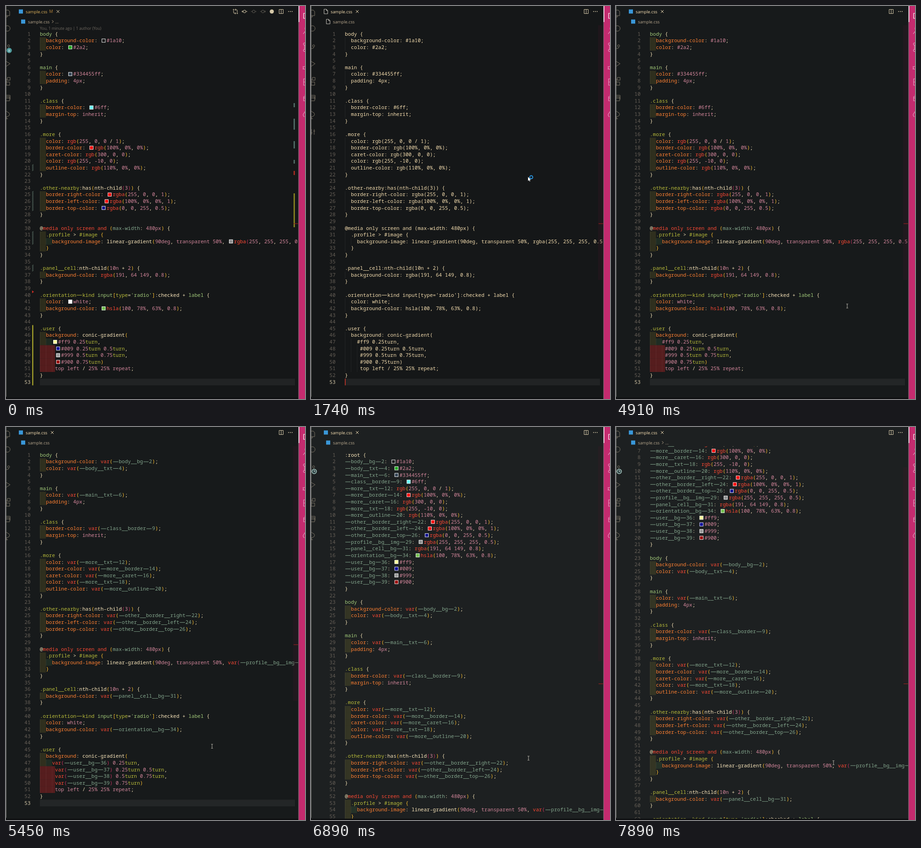
Recreate the animation shown at these times as an HTML page with a canvas. Size 653 px wide and 858 px high, loop 8 s.

```html
<!DOCTYPE html>
<html lang="en">
<head>
<meta charset="utf-8">
<title>Editor</title>
<style>
html, body { margin: 0; height: 100%; overflow: hidden; background: #151718; }
canvas { display: block; }
</style>
</head>
<body>
<canvas width="653" height="858"></canvas>
<script>
const c = document.querySelector('canvas').getContext('2d');
const LOOP = 8000, CW = 6.622, LH = 14.615, X0 = 74, TOP = 53.6;
const MONO = '500 11.04px "Noto Sans Mono", monospace', THIN = MONO.slice(4), SANS = '"Open Sans", sans-serif';
const CREAM = '#ebdbb2', PINK = '#d3869b', RED = '#fb4934', ORANGE = '#fe8032',
  OLIVE = '#b8bb3a', GREEN = '#a0c878', PALE = '#fbe7bc', AQUA = '#83a58c';

// [name|value] gets a swatch and may become var(--name); "!" means no swatch
const CODE = `body {
  background-color: [body__bg--2|#1a10];
  color: [body__txt--4|#2a2];
}

main {
  color: [main__txt--6|#334455ff];
  padding: 4px;
}

.class {
  border-color: [class__border--9|#6ff];
  margin-top: inherit;
}

.more {
  color: [more__txt--12!rgb(255, 0, 0 / 1)];
  border-color: [more__border--14|rgb(100%, 0%, 0%)];
  caret-color: [more__caret--16!rgb(300, 0, 0)];
  color: [more__txt--18!rgb(255, -10, 0)];
  outline-color: [more__outline--20!rgb(110%, 0%, 0%)];
}

.other-nearby:has(nth-child(3)) {
  border-right-color: [other__border__right--22|rgba(255, 0, 0, 1)];
  border-left-color: [other__border__left--24|rgba(100%, 0%, 0%, 1)];
  border-top-color: [other__border__top--26|rgba(0, 0, 255, 0.5)];
}

@media only screen and (max-width: 480px) {
  .profile > #image {
    background-image: linear-gradient(90deg, transparent 50%, [profile__bg__img--29|rgba(255, 255, 255, 0.5)] 50%);
  }
}

.panel__cell:nth-child(10n + 2) {
  background-color: [panel__cell__bg--31!rgba(191, 64 149, 0.8)];
}

.orientation--kind input[type='radio']:checked + label {
  color: [|white];
  background-color: [orientation__bg--34|hsla(100, 78%, 63%, 0.8)];
}

.user {
  background: conic-gradient(
    [user__bg--36|#ff9] 0.25turn,
     [user__bg--37|#009] 0.25turn 0.5turn,
     [user__bg--38|#999] 0.5turn 0.75turn,
     [user__bg--39|#900] 0.75turn)
     top left / 25% 25% repeat;
}
`;
const SLOT = /\[([\w-]*)([|!])(.*?)\]/g;
const SW = '\x01';
const withValues = sw => CODE.replace(SLOT, (m, n, k, v) => (sw && k === '|' ? SW : '') + v);
const withVars = CODE.replace(SLOT, (m, n, k, v) => n ? `var(--${n})` : v);
const root = sw => ':root {\n' + [...CODE.matchAll(SLOT)].filter(m => m[1])
  .map(([, n, k, v]) => `--${n}: ${sw && k === '|' ? SW : ''}${v};\n`).join('') + '}\n\n';

const RULES = [
  [/\s+/y, CREAM], [/--\w[\w-]*/y, AQUA], [/#[\da-f]+\b/y, PINK], [/[.#][a-z_][\w-]*/y, OLIVE],
  [/max-width/y, AQUA], [/[a-z-]+(?=:)/y, ORANGE], [/:[a-z-]+/y, PALE],
  [/[a-z-]+-(gradient|child)/y, PALE], [/(rgba?|hsla|var)(?=\()/y, RED],
  [/(media|only|screen|and)\b/y, RED], [/(body|main|input|label)\b/y, GREEN],
  [/type|turn/y, OLIVE], [/'\w+'/y, GREEN], [/-?\d[\d.]*(%|px|deg|n)?/y, PINK],
  [/[a-z]+/y, PINK], [/[^]/y, CREAM]
];
function nextToken(line, i) {
  for (const [re, color] of RULES) {
    re.lastIndex = i;
    const m = re.exec(line);
    if (m) return [m[0], color];
  }
}

// Bracket colours: one shared stack, or one stack per bracket type
const NATIVE = ['#ffd700', '#da70d6', '#179fff'];
const BY_TYPE = { '{': ['#f2e0b5', '#fabd2f'], '(': ['#fabd2f', '#c2325f'], '[': ['#fabd2f'] };
function makeBrackets(native) {
  const depth = { '{': 0, '(': 0, '[': 0 };
  return ch => {
    const kind = { '}': '{', ')': '(', ']': '[' }[ch] || ch;
    if (ch !== kind) depth[kind]--;
    const list = native ? NATIVE : BY_TYPE[kind];
    const d = native ? depth['{'] + depth['('] + depth['['] : depth[kind];
    if (ch === kind) depth[kind]++;
    return list[Math.min(d, list.length - 1)];
  };
}

function rect(color, x, y, w, h) { c.fillStyle = color; c.fillRect(x, y, w, h); }
function disc(color, x, y, r) { c.fillStyle = color; c.beginPath(); c.arc(x, y, r, 0, 7); c.fill(); }
function text(s, x, y, color, font, align = 'left') {
  c.font = font; c.fillStyle = color; c.textAlign = align; c.fillText(s, x, y);
}
function line(d, x, y, color, w = 1) {
  c.save(); c.translate(x, y); c.strokeStyle = color; c.lineWidth = w; c.stroke(new Path2D(d)); c.restore();
}

function drawSwatch(x, y, color) {
  rect(color, x + 2.5, y - 4.2, 8.4, 8.4);
  c.strokeStyle = '#eee'; c.lineWidth = 1;
  c.strokeRect(x + 3, y - 3.7, 7.4, 7.4);
}

function drawLine(s, y, style, bracket) {
  let x = X0;
  for (let i = 0; i < s.length;) {
    let [tok, color] = nextToken(s, i);
    i += tok.length;
    if (tok === SW) {
      drawSwatch(x, y + LH / 2, /^(#\w+|\w+\([^)]*\)|\w+)/.exec(s.slice(i))[0]);
      x += 13.2;
      continue;
    }
    if (/[{}()[\]]/.test(tok)) color = bracket(tok);
    if (style === 'plain') color = '#f3dcae';
    // a double hyphen is one joined dash
    text(tok.replace(/--/g, '  '), x, y + 11.1, color, MONO);
    for (const m of tok.matchAll(/--/g)) rect(color, x + m.index * CW + 1, y + 7.2, CW * 2 - 2, 1);
    x += tok.length * CW;
  }
}

function drawIndent(n, y, rainbow) {
  if (rainbow && n % 2) rect('rgba(128,32,32,.6)', X0, y, n * CW, LH);
  for (let k = 0; k < n; k += 2) {
    const x = X0 + k * CW;
    if (rainbow && n % 2 === 0)
      rect(k % 4 ? 'rgba(127,255,127,.08)' : 'rgba(255,235,64,.1)', x, y, CW * 2, LH);
    rect('rgba(255,255,255,.08)', x, y, 0.8, LH);
  }
}

function drawCode(s) {
  c.save();
  c.beginPath(); c.rect(0, 42, 638, 813); c.clip();
  const bracket = makeBrackets(s.style === 'native');
  s.doc.split('\n').forEach((str, i) => {
    const y = TOP + i * LH - s.scroll, active = !s.root && i === 52;
    if (active) {
      rect('rgba(255,255,255,.05)', X0, y, 557, LH);
      if (s.caret) rect('#e0392b', X0, y, 1.4, LH);
    }
    drawIndent(/^ */.exec(str)[0].length, y, s.style === 'full');
    text(i + 1, 53.5, y + 11.1, active ? '#d5c8a8' : '#665f57', THIN, 'right');
    drawLine(str, y, s.style, bracket);
  });
  c.restore();
}

function drawGit() {
  text('You, 1 minute ago | 1 author (You)', 74, 52, '#6d675f', '8.4px ' + SANS);
  const top = n => TOP + (n - 1) * LH;
  for (const [from, n] of [[21, 1], [25, 3], [31, 2], [36, 1]])
    for (let y = top(from); y < top(from + n) - 1; y += 2.4) line('M0 2L3-0', 57, y, '#6f8a7c', 0.9);
  rect('#b3b02c', 57.3, top(45), 2.2, 9 * LH);
  c.fillStyle = '#cc2e24'; c.fill(new Path2D('M57 621l4 3l-4 3z'));
  for (const [y, h] of [[212, 9], [246, 24], [295, 16], [336, 8]]) rect('#4c6762', 628, y, 3, h);
  rect('#9c2a20', 628, 360, 3, 9);
  rect('#807c20', 628, 409, 3, 74);
}

const ICONS = [
  [16, 'M-2-7h6l3 3v9h-9zM-2-3h-5v11h9v-3'],
  [51, 'M8-2a6 6 0 1 1-12 0a6 6 0 1 1 12 0M-2 2L-8 10'],
  [89, 'M7-2a2.3 2.3 0 1 1-4.6 0a2.3 2.3 0 1 1 4.6 0M-3-6a2.3 2.3 0 1 1-4.6 0a2.3 2.3 0 1 1 4.6 0M-3 8a2.3 2.3 0 1 1-4.6 0a2.3 2.3 0 1 1 4.6 0M-5-4v10M5 1c0 4-6 2-9 4'],
  [126, 'M-4-7L8 0L-1 6M-2 6a3 3 0 1 1-6 0a3 3 0 1 1 6 0M-9 3l2 1M-9 9l2-1'],
  [164, 'M-7-5h7v14h-7zM-7 2h14v7h-14M2-8h6v6h-6z'],
  [201, 'M-7-3h14v9h-14zM-5-6h13v9M-7 0h14'],
  [237, 'M-5 5a4.5 4.5 0 0 1-1-8a5 5 0 0 1 9-2a4.5 4.5 0 0 1 2 8l-5 2v5M-3 9h6'],
  [275, 'M0-6v12M-2 2h4M6-6v12M4-2h4']
];

function drawSides(s) {
  ICONS.forEach(([y, d], i) => {
    if (s.icons && (i < 7 || s.sliders) && (s.icons > 1 || i === 5 || i === 6)) line(d, 1, y, '#7d7566', 1);
  });
  if (s.badge) {
    disc('#151718', 7, 97, 6.6);
    disc(s.badge === 'clock' ? '#a9c9c2' : '#4f9a9c', 7, 97, 5.8);
    if (s.badge === 'clock') { disc('#33484a', 7, 97, 4.3); line('M0-3v3h2.5', 7, 97, '#dfeee8'); }
    else text(s.badge, 7, 99.8, '#fff', '7.5px ' + SANS, 'center');
  }
  rect('#85857f', 0, 0, 0.8, 853);
  rect('#0e0f11', 0, 855, 639, 3);
  rect('#c42b6f', 639.4, 0, 14, 858);
  rect('#a98c9a', 638.6, 0, 0.9, 858);
  rect('#fff', 639, 0, 1.5, 35);
  ICONS.slice(0, 7).forEach(([y, d], i) => line(d, 657, y + 3 * (i === 0 || i === 3), i ? '#e59bbf' : '#fff', 1.2));
}

function fileIcon(x, y, css) {
  if (css) rect('#3a97d8', x - 4.5, y - 4.5, 9, 9);
  else line('M-4-5h5l3 3v7h-8zM1-5v3h3', x, y, '#d8d5cc', 0.9);
}

function drawHeader(s) {
  const font = '9.3px ' + SANS;
  fileIcon(32.5, 12, s.css); fileIcon(37.5, 34, s.css);
  text('sample.css', 43, 15.5, s.git ? '#e0b45c' : '#fbe3b5', font);
  text('sample.css', 48, 37.5, s.icons === 1 ? '#cfa476' : '#b9a88e', font);
  if (s.crumb) {
    line('M-1.5-3l3 3l-3 3', 102, 34, '#b9a88e');
    text('...', 107.5, 37.5, '#b9a88e', font);
  }
  if (s.git) text('M', 94.5, 15.3, '#c08b3c', '8.8px ' + SANS);
  if (s.icons < 2) return;
  line('M-3-3l6 6M3-3l-6 6', s.git ? 113.5 : 101, 12, '#efdcb4');
  line('M-4.5-4.5h9v9h-9zM0-4.5v9', 601, 12, '#d5c8a8');
  for (let i = -1; i < 2; i++) disc('#d5c8a8', 621 + i * 3.8, 12, 1);
  if (!s.git) return;
  line('M-4-2v4a2 2 0 0 0 2 2h3M4 2v-4a2 2 0 0 0-2-2h-3M1-6l-2 2l2 2M-1 6l2-2l-2-2M-3-4a1 1 0 1 1-2 0a1 1 0 1 1 2 0M5 4a1 1 0 1 1-2 0a1 1 0 1 1 2 0', 501, 12, '#d5c8a8');
  const ring = 'M3 0a3 3 0 1 1-6 0a3 3 0 1 1 6 0';
  line(ring + 'M-3 0h-3l2-2M-6 0l2 2M3 0h3', 521, 12, '#d5c8a8');
  line(ring + 'M-6 0h3M3 0h3', 541, 12, '#5d5a52');
  line(ring + 'M-6 0h3M3 0h3l-2-2M6 0l-2 2', 561, 12, '#5d5a52');
  disc('#d5c8a8', 580.5, 12, 4.5);
}

const POINTER = [[540, 474, 373], [2740, 520, 520], [2900, 560, 640], [3100, 595, 745], [3280, 612, 815],
  [3460, 619, 853], [3610, 624, 740], [3740, 630, 482], [3860, 630, 517], [4130, 605, 560], [4330, 570, 600],
  [4520, 540, 630], [4910, 505, 655], [5190, 470, 685], [5450, 450, 697], [5990, 460, 706],
  [6340, 475, 723], [7620, 475, 733]];
function drawPointer(t) {
  const p = POINTER.filter(k => k[0] <= t).pop();
  if (!p) return;
  const [, x, y] = p;
  if (t < 2450) {
    c.fillStyle = '#fff'; c.fill(new Path2D(`M${x} ${y}v9l2-2l1.5 3l1.3-.6l-1.4-2.9h2.8z`));
    line('M3.4 0a3.4 3.4 0 1 1-6.8 0a3.4 3.4 0 1 1 6.8 0', x + 7, y + 0.7, '#2a9cea', 1.7);
  } else line('M-2-4.5h1.4l.6.6l.6-.6h1.4M0-4v8M-2 4.5h1.4l.6-.6l.6.6h1.4', x, y, '#cfcbbf', 0.9);
}

function stateAt(t) {
  const git = t < 400, vars = t >= 5190, hasRoot = t >= 5600, sw = t >= 6640;
  return {
    git, root: hasRoot,
    bg: t < 4910 ? '#151718' : t < 5600 ? '#171a1b' : '#1d2021',
    icons: git ? 2 : t < 1340 ? 0 : t < 1480 ? 1 : 2,
    sliders: t >= 1740 && t < 2170,
    css: git || t >= 2170,
    badge: git ? '8' : t >= 6640 ? 'clock' : '',
    crumb: git || t >= 7620,
    code: git || t >= 1610,
    style: git || t >= 4910 ? 'full' : t < 2450 ? 'plain' : 'native',
    doc: (hasRoot ? root(sw) : '') + (vars ? withVars : withValues(git)),
    caret: (t >= 1740 && t < 2450) || (t >= 2950 && t < 3610) || (t >= 4130 && t < 4520),
    scroll: t < 7620 ? 0 : t < 7750 ? 32.2 : t < 7890 ? 64.5 : 96.7
  };
}

function draw(now) {
  const t = now % LOOP, s = stateAt(t);
  rect(s.bg, 0, 0, 653, 858);
  if (s.code) {
    drawCode(s);
    if (s.git) drawGit();
    else rect('rgba(70,20,40,.2)', 627, s.root ? 42 + s.scroll * 0.475 : 42, 10, s.root ? 469 : 556);
    rect('#951f20', 628, s.root ? 560 : 474.6, 10, 1.2);
  }
  if (s.icons) drawHeader(s);
  drawPointer(t);
  drawSides(s);
}

const start = performance.now();
function tick() {
  draw(performance.now() - start);
  requestAnimationFrame(tick);
}
tick();
</script>
</body>
</html>
```
